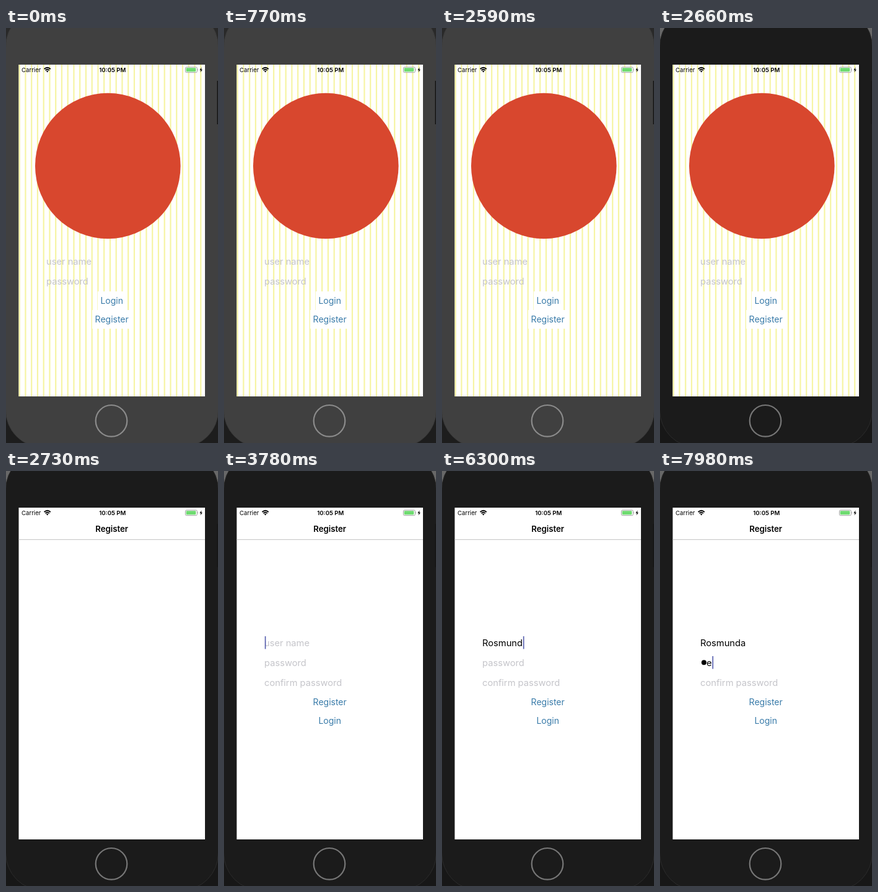
Recreate the animation shown at these times as an HTML page. Size 342 by 668 pixels, loop 8000 ms.

```html
<!DOCTYPE html>
<html lang="en">
<head>
<meta charset="utf-8">
<title>Sign up</title>
<style>
  html, body { margin: 0; width: 100%; height: 100%; overflow: hidden; background: #1b1b1b; }
  svg { display: block; width: 100vw; height: 100vh; }
  text { font-family: Inter, Roboto, sans-serif; }
  .field { font-size: 14.7px; }
  .hint { fill: #c5c5ca; }
  .button { font-size: 14px; fill: #397ba9; text-anchor: middle; }
  .bold { font-weight: 600; text-anchor: middle; }
</style>
</head>
<body>
<svg viewBox="0 0 342 668" preserveAspectRatio="none">
  <rect id="backTop" width="342" height="334"/>
  <rect id="backBottom" y="334" width="342" height="334"/>
  <rect id="phone" x="-.5" y="-30" width="343" height="705" rx="60"/>
  <rect x="340.5" y="85" width="1.5" height="70" fill="#151515"/>
  <circle id="home" cx="170" cy="632.3" r="25.3" fill="none" stroke-width="2.2"/>
  <rect x="20.5" y="59" width="300.5" height="534" fill="#fff"/>

  <g id="loginPage">
    <g id="stripes" fill="#f6f4a4"></g>
    <circle cx="164.3" cy="222" r="117.3" fill="#d8472e"/>
    <path d="M148 424h45v30h8v30h-62v-30h9z" fill="#fff"/>
    <text class="field hint" x="65" y="381">user name</text>
    <text class="field hint" x="65" y="413">password</text>
    <text class="button" x="170.7" y="444">Login</text>
    <text class="button" x="170.7" y="474">Register</text>
  </g>

  <g id="registerPage">
    <path d="M20.5 110.4H321" stroke="#bcbcbc" stroke-width=".9"/>
    <text class="bold" x="170.6" y="97.6" font-size="13.2">Register</text>
    <g id="form">
      <text id="user" class="field" x="65" y="282"></text>
      <circle id="bullet" cx="70.9" cy="308.3" r="4"/>
      <text id="pass" class="field" y="314"></text>
      <text class="field hint" x="65" y="346">confirm password</text>
      <text class="button" x="170.7" y="377">Register</text>
      <text class="button" x="170.7" y="407">Login</text>
      <rect id="caret" width="1.7" height="20.5" fill="#5a62b0"/>
    </g>
  </g>

  <text x="25" y="70.6" font-size="9.6">Carrier</text>
  <g fill="none" stroke="#000" stroke-width="1.8">
    <path d="M61.6 66q5.1-4.6 10.2 0M63.5 68.1q3.2-2.8 6.4 0"/>
  </g>
  <path d="M64.9 69.5q1.8-1.5 3.6 0l-1.8 1.9z"/>
  <text class="bold" x="171.8" y="70.6" font-size="9.6">10:05 PM</text>
  <rect x="289.4" y="63" width="19" height="8.6" rx="2" fill="#fff" stroke="#8d8d8d" stroke-width=".8"/>
  <rect x="290.7" y="64.3" width="15.6" height="6" rx="1" fill="#6edb70"/>
  <path d="M309.4 65.8q1.5 1.5 0 3z" fill="#8d8d8d"/>
  <path d="M315.6 63.2l-3.2 4.5h2l-.8 3.7 3.3-4.7h-2z"/>
</svg>
<script>
const LOOP = 8000, TICK = 70;
const NAME = "Rosmunda";
const KEY_TIMES = [5390, 5600, 5740, 5880, 6020, 6160, 6300, 6440];
const DARK_AT = 2660, PAGE_AT = 2730, FORM_AT = 2800;
const USER_FOCUS = 3780, PASS_FOCUS = 6930, PASS_KEY1 = 7840, PASS_KEY2 = 7980;

const el = id => document.getElementById(id);
const show = (id, on) => el(id).setAttribute("display", on ? "inline" : "none");
const set = (id, attrs) => {
  for (const key in attrs) el(id).setAttribute(key, attrs[key]);
};
const ramp = (t, from, to) => Math.min(1, Math.max(0, (t - from) / (to - from)));

const stripes = [];
for (let x = 20.6; x < 320; x += 9.75) {
  stripes.push(`<rect x="${x.toFixed(2)}" y="59" width="2.2" height="534"/>`);
}
el("stripes").innerHTML = stripes.join("");

function setField(id, typed, hint) {
  el(id).textContent = typed || hint;
  el(id).classList.toggle("hint", !typed);
  return typed ? el(id).getComputedTextLength() : 0;
}

function caretAlpha(t) {
  if (t < USER_FOCUS) return 0;
  if (t < 4830) return 1 - ramp(t, 4340, 4550);
  if (t < 5250) return ramp(t, 4830, 4970);
  if (t < KEY_TIMES[0]) return 1 - ramp(t, 5250, 5460);
  if (t < PASS_KEY1) return 1 - ramp(t, 7490, 7700);
  return 1;
}

function draw(time) {
  const t = Math.floor(time / TICK) * TICK;
  const dark = t >= DARK_AT;

  set("backTop", { fill: dark ? "#686868" : "#292929" });
  set("backBottom", { fill: dark ? "#171717" : "#1d1d1d" });
  set("phone", { fill: dark ? "#1b1b1b" : "#404040", stroke: dark ? "#2b2b2b" : "#383838" });
  set("home", { stroke: dark ? "#777" : "#8b8b8b" });
  show("loginPage", t < PAGE_AT);
  show("registerPage", t >= PAGE_AT);
  show("form", t >= FORM_AT);
  if (t < FORM_AT) return;

  const count = KEY_TIMES.filter(k => t >= k).length;
  const userWidth = setField("user", NAME.slice(0, count), "user name");

  const masked = t >= PASS_KEY2;
  const passX = masked ? 75 : 65;
  const passWidth = setField("pass", masked ? "e" : t >= PASS_KEY1 ? "p" : "", "password");
  set("pass", { x: passX });
  show("bullet", masked);

  const inPass = t >= PASS_FOCUS;
  const end = inPass ? passX + passWidth : 65 + userWidth;
  set("caret", { x: end + .8, y: inPass ? 298 : 266, opacity: caretAlpha(t) });
}

const start = performance.now();
function frame() {
  draw((performance.now() - start) % LOOP);
  requestAnimationFrame(frame);
}
frame();
</script>
</body>
</html>
```
